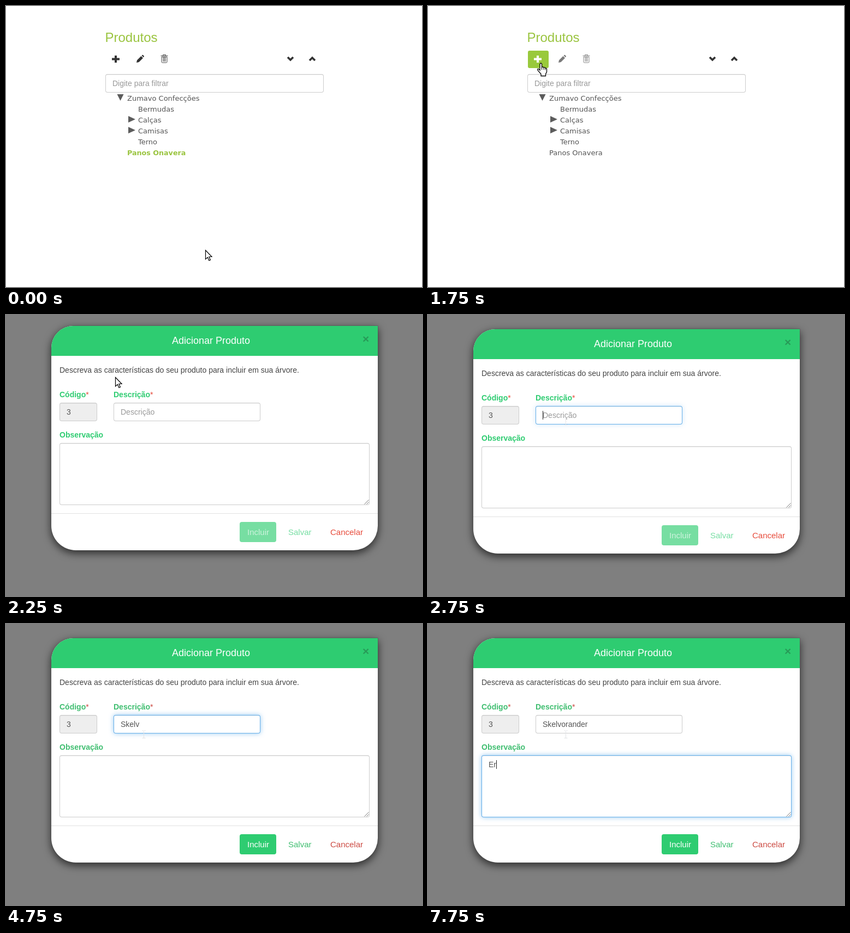
Write an HTML page with a canvas that moves like this. It is 762 by 516 pixels and loops after 8 s.

```html
<!DOCTYPE html>
<html lang="pt">
<head>
<meta charset="utf-8">
<style>
  html, body { margin: 0; width: 100%; height: 100%; overflow: hidden; background: #fff; }
  canvas { display: block; }
</style>
</head>
<body>
<canvas id="stage" width="762" height="516"></canvas>
<script>
const ctx = document.getElementById('stage').getContext('2d');
const LOOP = 8000, TICK = 250;
const SANS = '"Liberation Sans", Arial, sans-serif';
const TREE = '"DejaVu Sans", Verdana, sans-serif';
const GREEN = '#2ecc71', LIME = '#9ac43f';
const PRODUCT = 'Skelvorander', NOTE = 'Er';

// Keyframes: [start time, value...], each held until the next one.
const POINTER = [
  [0, 'arrow', 365, 448], [250, 'arrow', 480, 454], [500, 'arrow', 627, 400],
  [750, 'arrow', 560, 310], [1000, 'arrow', 350, 180], [1250, 'arrow', 192, 79],
  [1500, 'hand', 200, 100], [1750, 'hand', 200, 104], [2000, 'arrow', 200, 104],
  [2250, 'arrow', 200, 114], [2500, 'arrow', 236, 152], [2750, 'beam', 252, 194],
  [3000, 'beam', 252, 202]
];
const TYPED = [[0, 0], [3500, 1], [3750, 2], [4000, 4], [4250, 5], [5250, 6],
  [5500, 7], [5750, 9], [6000, 10], [6250, 12]];
const NOTED = [[0, 0], [7500, 1], [7750, 2]];
const CARET = [[0, false], [2750, true], [4750, false], [5250, true], [7250, false], [7500, true]];
const SHADE = [[0, 0], [2000, 0.443], [2250, 0.5]];
const ENABLED = [[0, 0.65], [3500, 0.77], [3750, 1]];

const held = (keys, t) => keys.filter(k => k[0] <= t).pop().slice(1);

function text(str, x, y, color, size = 14, weight = '', family = SANS) {
  ctx.font = `${weight} ${size}px ${family}`;
  ctx.fillStyle = color;
  ctx.fillText(str, x, y);
  return x + ctx.measureText(str).width;
}

function shape(d, x, y, fill, stroke, width = 1) {
  const path = new Path2D(d);
  ctx.save();
  ctx.translate(x, y);
  ctx.lineWidth = width;
  if (fill) { ctx.fillStyle = fill; ctx.fill(path); }
  if (stroke) { ctx.strokeStyle = stroke; ctx.stroke(path); }
  ctx.restore();
}

function rounded(x, y, w, h, radius, fill) {
  ctx.beginPath();
  ctx.roundRect(x, y, w, h, radius);
  ctx.fillStyle = fill;
  ctx.fill();
}

function field(x, y, w, h, fill = '#fff', focus = 0) {
  ctx.save();
  if (focus) {
    ctx.shadowColor = `rgba(102,175,233,${0.7 * focus})`;
    ctx.shadowBlur = 8;
  }
  rounded(x, y, w, h, 4, focus ? '#66afe9' : '#ccc');
  ctx.restore();
  rounded(x + 1, y + 1, w - 2, h - 2, 3, fill);
  ctx.fillStyle = 'rgba(0,0,0,.06)';
  ctx.fillRect(x + 2, y + 1, w - 4, 1);
}

function caret(x, y) {
  ctx.fillStyle = '#222';
  ctx.fillRect(Math.round(x), y, 1, 16);
}

function drawPage(t) {
  const selected = t < 750, hover = t >= 1500;
  text('Produtos', 181.5, 66, LIME, 24);
  if (hover) rounded(183, 82, 38, 32, 3, '#99c93c');
  shape('M-7 0H7M0-6.5V6.5', 201, 97.5, null, hover ? '#fff' : '#333', 4);

  ctx.globalAlpha = selected ? 1 : 0.65;
  shape('M0 14L1 9.5L8.5 2L12 5.5L4.5 13ZM9.5 1L10.5 0Q11.5-.5 12.5 .5L13.5 1.5Q14.5 2.5 13.5 3.5L12.7 4.3Z',
    239, 90, '#333');
  shape('M0 2.5H13M4 2V.5H9V2M1.5 4.5V13.5Q1.5 15 3 15H10Q11.5 15 11.5 13.5V4.5ZM4.5 5V13M6.5 5V13M8.5 5V13',
    283.5, 89, null, '#444');
  ctx.globalAlpha = 1;
  shape('M-5-2.5L0 2.5L5-2.5', 521, 96.5, null, '#333', 3.6);
  shape('M-5 2.5L0-2.5L5 2.5', 561, 97.5, null, '#333', 3.6);

  field(182, 125, 400, 34);
  text('Digite para filtrar', 195, 147, '#999');

  const rows = ['Zumavo Confecções', 'Bermudas', 'Calças', 'Camisas', 'Terno'];
  rows.forEach((name, i) => text(name, i ? 242 : 222, 174 + 20 * i, '#555', 13, '', TREE));
  text('Panos Onavera', 222, 274, selected ? LIME : '#555',
    selected ? 12.7 : 13, selected ? 'bold' : '', TREE);
  shape('M0 0H12L6 12Z', 203.5, 162, '#5c5c5c');
  for (const y of [202, 222]) shape('M0 0L13 6L0 12Z', 224, y, '#5c5c5c');
}

function drawDialog(t) {
  const settled = t >= 3750;
  const label = settled ? '#3fbe70' : GREEN;
  const red = settled ? '#cc4a42' : '#e74c3c';
  const inName = t >= 2750 && t < 6750, inNote = t >= 6750;
  const [blink] = held(CARET, t), [enabled] = held(ENABLED, t);

  ctx.save();
  ctx.translate(0, t < 2500 ? 20 : 26);

  ctx.save();
  ctx.shadowColor = 'rgba(0,0,0,.65)';
  ctx.shadowBlur = 15;
  ctx.shadowOffsetY = 5;
  rounded(82.5, -0.5, 599, 413, [40, 0, 45, 45], '#555');
  ctx.restore();
  rounded(83, 0, 598, 412, [40, 0, 45, 45], '#fff');
  rounded(83, 0, 598, 55, [40, 0, 0, 0], GREEN);
  text('Adicionar Produto', 304, 33, '#fff', 18);
  text('×', 653, 31, '#289a58', 21, 'bold');
  text('Descreva as características do seu produto para incluir em sua árvore.', 98, 86, '#444');

  for (const [name, x] of [['Código', 98], ['Descrição', 197]])
    text('*', text(name, x, 131, label, 14, 'bold'), 131, red);
  text('Observação', 98, 205, label, 14, 'bold');

  field(98, 141, 69, 34, '#eee');
  text('3', 111, 163, '#555');

  field(197, 141, 269, 34, '#fff', inName ? (t < 3000 ? 0.5 : 1) : 0);
  const typed = PRODUCT.slice(0, held(TYPED, t)[0]);
  const nameEnd = text(typed, 210, 163, '#555');
  if (!typed) text('Descrição', 210, 163, '#999');
  if (inName && blink) caret(nameEnd, 150);

  field(98, 215, 568, 114, '#fff', inNote ? (t < 7000 ? 0.5 : 1) : 0);
  const noteEnd = text(NOTE.slice(0, held(NOTED, t)[0]), 111, 237, '#555');
  if (inNote && blink) caret(noteEnd, 224);
  shape('M0 8L8 0M4 8L8 4', 656.5, 319.5, null, '#777');

  ctx.fillStyle = '#e2e2e2';
  ctx.fillRect(83, 344, 598, 1);
  ctx.globalAlpha = enabled;
  rounded(428, 360, 67, 37, 4, GREEN);
  text('Incluir', 442, 384, '#fff', 15);
  text('Salvar', 517, 384, label, 15);
  ctx.globalAlpha = 1;
  text('Cancelar', 594, 384, red, 15);
  ctx.restore();
}

function drawPointer(t) {
  const [kind, x, y] = held(POINTER, t);
  if (kind === 'arrow') {
    shape('M0 0V16.5L3.8 13L6.4 19L8.9 18L6.4 12H11.5Z', x + 0.5, y + 0.5, '#fff', '#000', 1.2);
  } else if (kind === 'hand') {
    shape('M5 14V2.5Q6.7-.5 8.5 2.5V8.5Q10.5 7 12 9Q14 8 15 10Q17 9.5 17.5 12V17L15.5 21V24.5H7V21L1 14Q0 11 2.5 11.5Z',
      x, y, '#fff', '#000', 1.3);
    shape('M8.5 8V13M12 9V13M15 10V13.5', x, y, null, '#000');
  } else {
    shape('M-3-7H-1M1-7H3M0-6.5V6.5M-3 7H3', x + 0.5, y + 0.5, null, '#e2e4e6');
  }
}

function draw(now) {
  const t = Math.floor((now % LOOP) / TICK) * TICK;
  ctx.fillStyle = '#fff';
  ctx.fillRect(0, 0, 762, 516);
  const [shade] = held(SHADE, t);
  // The page below the dialog is almost entirely covered by the flat backdrop.
  if (t < 2250) drawPage(t);
  ctx.fillStyle = `rgba(0,0,0,${shade})`;
  ctx.fillRect(0, 0, 762, 516);
  if (t >= 2250) drawDialog(t);
  drawPointer(t);
}

const start = performance.now();
function loop() {
  draw(performance.now() - start);
  requestAnimationFrame(loop);
}
loop();
</script>
</body>
</html>
```
